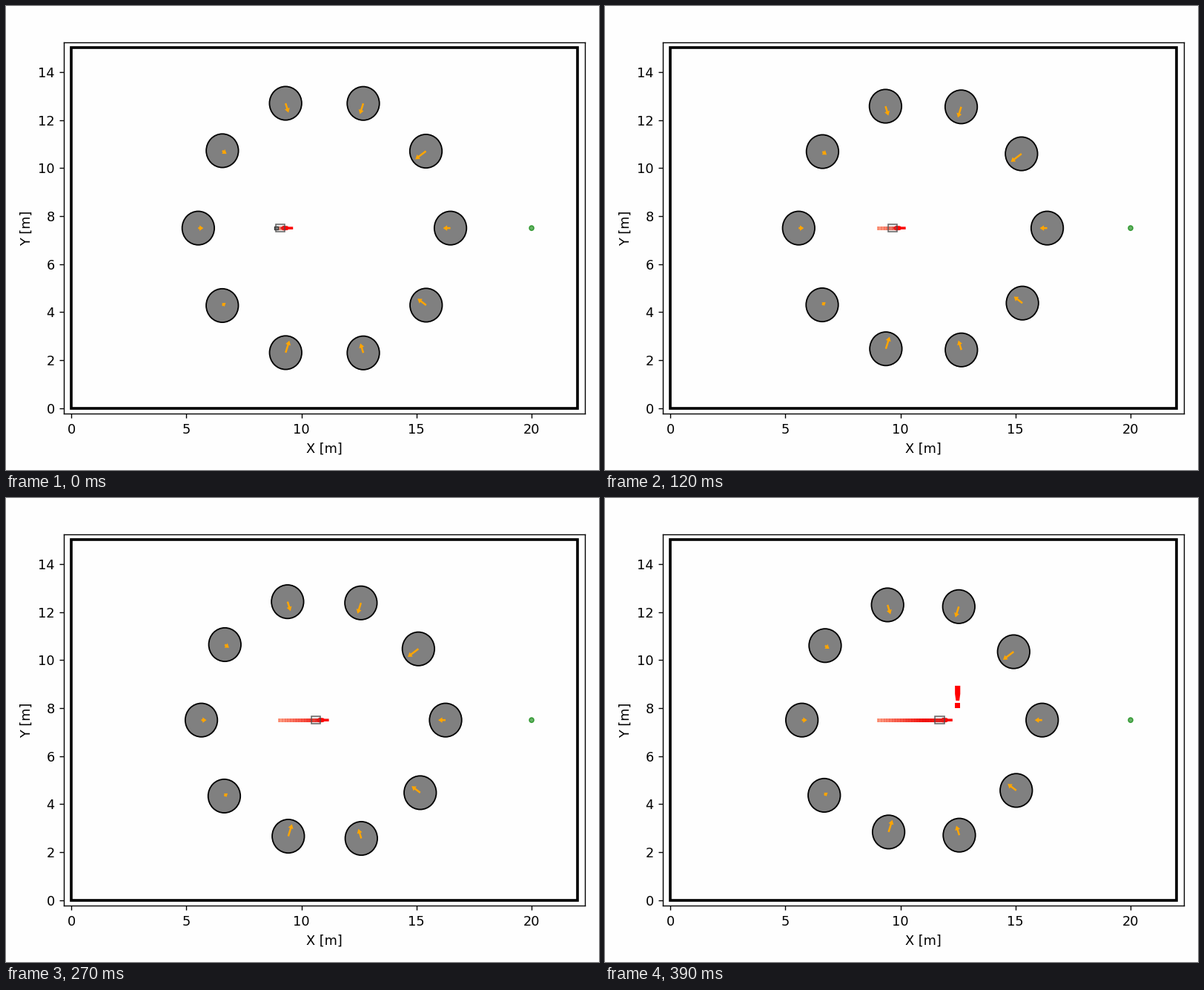
A matplotlib script that plays this animation: 800 by 625 pixels, repeating every 0.42 s.

```python
import numpy as np
import matplotlib.pyplot as plt
from matplotlib.animation import FuncAnimation
from matplotlib.collections import PolyCollection
from matplotlib.patches import Circle, Polygon, Rectangle

W, H, DPI = 800, 625, 125
FRAMES, INTERVAL = 14, 30
BG = "#fefefe"
SIZE = 10.2
MID = np.array([11.0, 7.5])
RING, RADIUS = 5.5, 0.7

# Inward speed of each ring member, counter-clockwise from the right
SPEEDS = np.array([.316, .605, .49, .42, .203, .203, .159, .554, .425, .477]) / 12
ANGLES = np.arange(10) * np.pi / 5
OUTWARD = np.column_stack([np.cos(ANGLES), np.sin(ANGLES)])

plt.rcParams["font.family"] = "DejaVu Sans"
fig = plt.figure(figsize=(W / DPI, H / DPI), dpi=DPI, facecolor=BG)
left, right, top, bottom = 77.8, 781.4, 49.3, 549.0
ax = fig.add_axes([left / W, 1 - bottom / H, (right - left) / W, (bottom - top) / H],
                  facecolor=BG)
ax.set(xlim=(-0.33, 22.33), ylim=(-0.225, 15.225),
       xticks=range(0, 21, 5), yticks=range(0, 15, 2))
ax.tick_params(labelsize=SIZE)
ax.tick_params(axis="x", pad=4)
fig.text(429.5 / W, 1 - 601.5 / H, "X [m]", size=SIZE, ha="center", va="baseline")
fig.text(33.3 / W, 1 - 299 / H, "Y [m]", size=SIZE, ha="center", va="baseline",
         rotation=90, rotation_mode="anchor")

# Walls and goal
ax.add_patch(Rectangle((0, 0), 22, 15.03, fill=False, ec="black", lw=2.1))
ax.add_patch(Circle((20, 7.5), 0.1, fc=(0, .5, 0, .6), ec=(0, .5, 0, .7), lw=0.8))


def arrow_shape(tail, direction, length):
    """Outline of a flat arrow in data units."""
    side = np.array([-direction[1], direction[0]])
    grow = min(1, length / 0.22)
    neck = length - min(0.18, 0.75 * length)
    outline = [(0, .04), (neck, .04), (neck, .115 * grow), (length, 0),
               (neck, -.115 * grow), (neck, -.04), (0, -.04)]
    return [tail + a * direction + b * side for a, b in outline]


def block(x0, x1, half):
    return [(x0, 7.5 - half), (x1, 7.5 - half), (x1, 7.5 + half), (x0, 7.5 + half)]


def sim_step(i):
    return np.interp(i, [0, 3, 6, 13], [0, 3, 5, 12])


def robot_x(s):
    return 9.075 + .129 * s + .00966 * s**2 - .00018 * s**3


discs = [ax.add_patch(Circle((0, 0), RADIUS, fc="#808080", ec="black", lw=1.05, zorder=3))
         for _ in ANGLES]
arrows = [ax.add_patch(Polygon(np.zeros((7, 2)), fc="#ffa500", lw=0, zorder=4))
          for _ in ANGLES]

trail = ax.add_collection(PolyCollection([], lw=0, zorder=5), autolim=False)
ghost = ax.add_patch(Rectangle((8.81, 7.44), 0.19, 0.13, fc="#909090", ec="#303030",
                               lw=0.8, zorder=5))
nose = ax.add_patch(Polygon(np.zeros((8, 2)), fc="#fb0505", lw=0, zorder=6))
body = ax.add_patch(Rectangle((0, 0), 0.4, 0.3, fc=(.5, .5, .5, .15),
                              ec=(.3, .3, .3, .85), lw=0.9, zorder=7))

# Warning sign
warning = [ax.add_patch(Polygon(p, fc="red", lw=0, zorder=8)) for p in (
    [(12.37, 8.93), (12.6, 8.93), (12.6, 8.59), (12.56, 8.31), (12.41, 8.31), (12.37, 8.59)],
    [(12.37, 8.22), (12.6, 8.22), (12.6, 8.0), (12.37, 8.0)])]

PALE, RED = np.array([1, .63, .52]), np.array([.96, .08, .06])
NOSE = np.array([(0, 0), (.13, .1), (.32, .085), (.36, .055), (.56, .055),
                 (.56, -.055), (.36, -.055), (.32, -.085), (.13, -.1)])


def draw_trail(end):
    shapes, colors = [], []
    for x in np.arange(9.0, end + 0.1, 0.12):
        tint = PALE + (RED - PALE) * min(1, (x - 9) / 1.9)
        shapes += [block(x, x + 0.12, .078), block(x + .02, x + 0.09, .078)]
        colors += [tint, tint * [.97, .85, .85]]
    trail.set_verts(shapes)
    trail.set_facecolor(colors)


def update(i):
    s = sim_step(i)
    for disc, arrow, out, speed in zip(discs, arrows, OUTWARD, SPEEDS):
        center = MID + out * (RING - speed * (s + 1))
        disc.center = center
        arrow.set_xy(arrow_shape(center, -out, .86 * 12 * speed + .05))
    x = robot_x(s)
    draw_trail(x)
    nose.set_xy(NOSE + [x, 7.5])
    body.set_xy((x - 0.2, 7.35))
    ghost.set_visible(i == 0)
    for part in warning:
        part.set_visible(i == FRAMES - 1)
    return []


anim = FuncAnimation(fig, update, frames=FRAMES, interval=INTERVAL,
                     init_func=lambda: update(0), repeat=True, repeat_delay=0)
plt.show()
```
